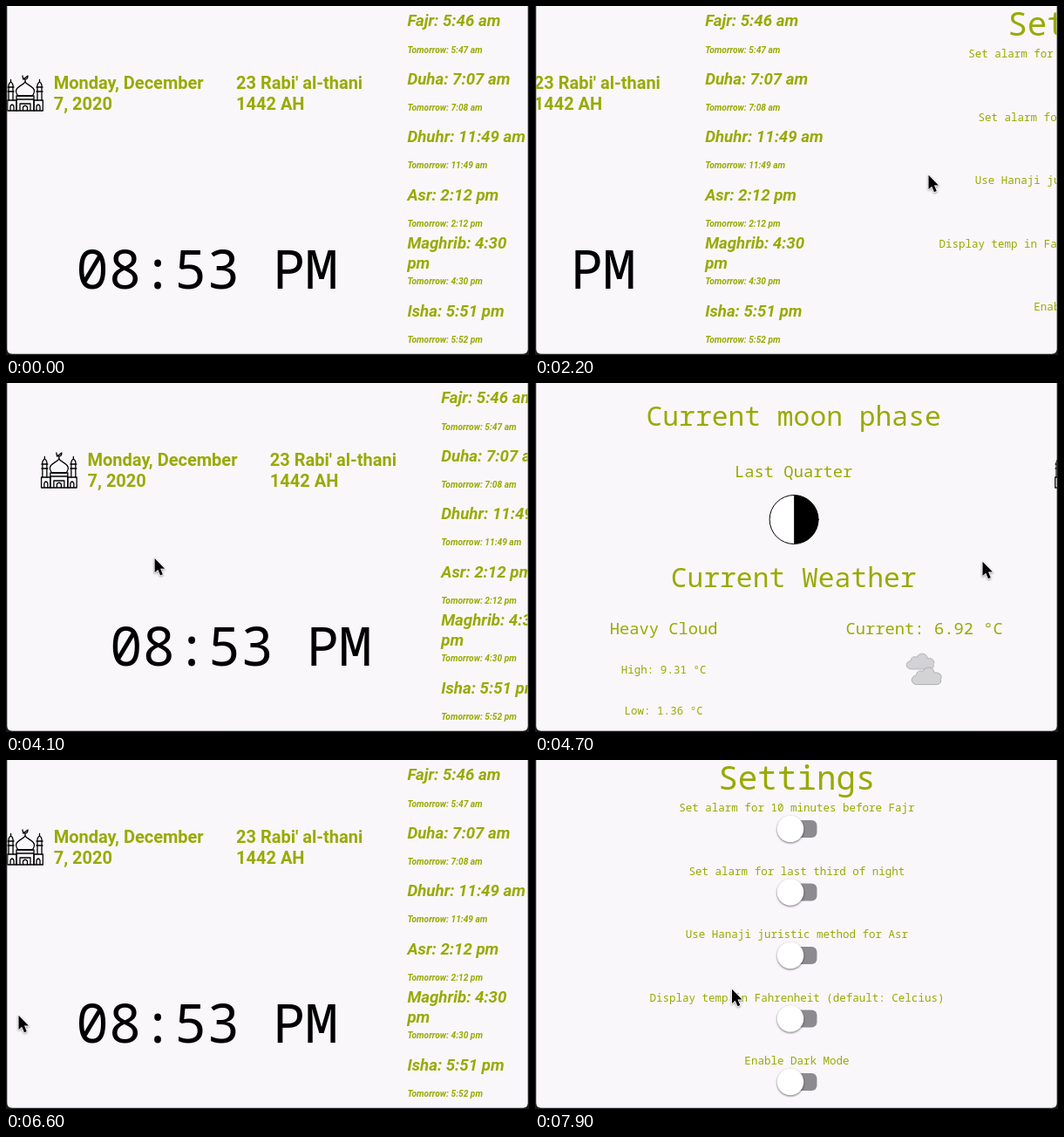
These frames come from a looping animation (600x400 px, 8 s). An HTML page:

```html
<!DOCTYPE html>
<html lang="en">
<head>
<meta charset="utf-8">
<title>Prayer times</title>
<style>
  html, body { margin: 0; width: 100%; height: 100%; overflow: hidden; background: #1b1a1c; }
  svg { display: block; width: 600px; height: 400px; }
  text { fill: #98aa00; white-space: pre; }
  .mono { font-family: "Roboto Mono", "Noto Sans Mono", monospace; text-anchor: middle; }
  .bold { font-family: Roboto, sans-serif; font-weight: 700; }
  .slant { font-style: italic; }
  .clock { fill: #000; }
  .line { fill: none; stroke: #000; stroke-width: 1.3; stroke-linejoin: round; stroke-linecap: round; }
  .cloud { fill: #d3d2d5; stroke: #aaa9ac; stroke-width: .9; }
  .thumb { fill: #fff; filter: drop-shadow(0 1px 1.3px rgba(0, 0, 0, .55)); }
  #pointer { filter: drop-shadow(0 1.5px 1.3px rgba(0, 0, 0, .4)); }
</style>
</head>
<body>
<svg viewBox="0 0 600 400">
  <defs>
    <clipPath id="window"><path d="M1.300 0H598.700V393Q598.700 398.700 593 398.700H7Q1.300 398.700 1.300 393Z"/></clipPath>
    <path id="puff" d="M6 20.500C-1.500 20.500-2 11 5 10C5.500 5 10 3.500 12.500 5.500C15-1.500 25-.5 25.500 7C32 5.500 35 11 32.500 14.500C34 18 31 20.500 28 20.500Z"/>
    <g id="tower">
      <path d="M2 29V14H7V29M1 14H8M1 19H8M2 14Q1.500 10 4.500 8Q7.500 10 7 14M4.500 8V5.500"/>
      <path d="M.7 29H11V41H.7ZM4 41V36Q6 32 8 36V41"/>
    </g>
  </defs>
  <g clip-path="url(#window)">
    <rect width="600" height="400" fill="#f9f7fa"/>
    <g id="strip">
      <g class="line" transform="translate(1 79)">
        <path d="M18 1Q18 5 21 5T24 1M18.500 5L23.500 1.500M21 5V8"/>
        <path d="M21 8C19 12 10 13 10.500 19Q11 22 13 24H29Q31 22 31.500 19C32 13 23 12 21 8Z"/>
        <path d="M11 24H31V41H11ZM11 28H31M15 41V33H27V41M18.500 41V37Q21 33.500 23.500 37V41"/>
        <use href="#tower"/>
        <use href="#tower" transform="translate(42 0) scale(-1 1)"/>
      </g>
      <g>
        <circle cx="-298" cy="156.500" r="28" fill="#fff"/>
        <path d="M-298 128.500A28 28 0 0 1-298 184.500Z"/>
        <circle cx="-298" cy="156.500" r="28" class="line" style="stroke-width:1"/>
      </g>
      <use href="#puff" class="cloud" transform="translate(-169 309.500) scale(.95 .9)"/>
      <use href="#puff" class="cloud" transform="translate(-163 325.300) scale(1.020 .99)"/>
    </g>
  </g>
  <path id="pointer" d="M.5 .7V17L4.200 13.700L7 20.200L9.800 19L7 12.600H12Z"
        stroke="#fff" stroke-width="1.600" paint-order="stroke" stroke-linejoin="round"/>
</svg>
<script>
const LOOP = 8000, STEP = 100, PAGE = 598, UNIT = 0.783;
const strip = document.getElementById("strip");
const pointer = document.getElementById("pointer");

function add(tag, attrs, content = "") {
  const el = document.createElementNS("http://www.w3.org/2000/svg", tag);
  for (const key in attrs) el.setAttribute(key, attrs[key]);
  el.textContent = content;
  strip.append(el);
}
const label = (cls, content, x, y, size) =>
  add("text", { class: cls, x, y, "font-size": size }, content);
const mono = (content, x, y, size) => label("mono", content, x, y, size * UNIT);

function stack(cls, content, x, y, size, leading) {
  content.split("\n").forEach((line, i) => label(cls, line, x, y + i * leading, size));
}

// Home page
stack("bold", "Monday, December\n7, 2020", 54.7, 95, 20, 23.5);
stack("bold", "23 Rabi' al-thani\n1442 AH", 264, 95, 20, 23.5);
label("mono clock", "08:53 PM", 230.5, 324, 80 * UNIT);

[
  ["Fajr: 5:46 am", "5:47 am"],
  ["Duha: 7:07 am", "7:08 am"],
  ["Dhuhr: 11:49 am", "11:49 am"],
  ["Asr: 2:12 pm", "2:12 pm"],
  ["Maghrib: 4:30\npm", "4:30 pm"],
  ["Isha: 5:51 pm", "5:52 pm"]
].forEach(([today, tomorrow], i) => {
  const y = 23.3 + i * 66.45;
  const rise = today.includes("\n") ? 11.2 : 0;
  stack("bold slant", today, 460.4, y - rise, 18.7, 22.6);
  label("bold slant", "Tomorrow: " + tomorrow, 460.4, y + 30.2, 10.2);
});

// Moon and weather page
const moonX = -PAGE / 2 + 0.5, leftX = moonX - 149, rightX = moonX + 150;
mono("Current moon phase", moonX, 48.5, 40);
mono("Last Quarter", moonX, 108, 24);
mono("Current Weather", moonX, 233.5, 40);
mono("Heavy Cloud", leftX, 288, 24);
mono("High: 9.31 °C", leftX, 333, 16);
mono("Low: 1.36 °C", leftX, 380.3, 16);
mono("Current: 6.92 °C", rightX, 288, 24);

// Settings page
const settingsX = PAGE * 1.5 + 0.7;
mono("Settings", settingsX, 33.5, 48);
[
  "Set alarm for 10 minutes before Fajr",
  "Set alarm for last third of night",
  "Use Hanaji juristic method for Asr",
  "Display temp in Fahrenheit (default: Celcius)",
  "Enable Dark Mode"
].forEach((name, i) => {
  const y = 79 + i * 72.5;
  mono(name, settingsX, y - 20, 16);
  add("rect", { x: settingsX - 17, y: y - 10, width: 40, height: 20, rx: 6, fill: "#8d8b90" });
  add("circle", { class: "thumb", cx: settingsX - 7.5, cy: y, r: 15.3 });
});

// Each swipe turns one page, fastest at its middle time
const swipes = [
  { mid: 1075, turn: -1 },
  { mid: 2183, turn: 1 },
  { mid: 4300, turn: 1 },
  { mid: 5850, turn: -1 },
  { mid: 7400, turn: -1 }
];
const offsetAt = t => swipes.reduce(
  (x, { mid, turn }) => x + turn * PAGE / (1 + Math.exp((mid - t) / 75)), 0);

// Where the hand grabs, lets go and rests: time, x, y
const stops = [
  [400, 560, 260], [900, 386, 206], [1100, 47, 205],
  [1950, 118, 196], [2200, 451, 193], [3000, 394, 190],
  [4000, 150, 200], [4700, 513, 204],
  [5600, 480, 260], [6000, 14, 292], [6600, 14, 292],
  [7200, 575, 272], [7600, 225.5, 262]
];

function tipAt(t) {
  const next = stops.findIndex(s => s[0] > t);
  if (next < 1) return stops.at(next).slice(1);
  const [t0, x0, y0] = stops[next - 1], [t1, x1, y1] = stops[next];
  const u = (t - t0) / (t1 - t0), k = u * u * (3 - 2 * u);
  return [x0 + (x1 - x0) * k, y0 + (y1 - y0) * k];
}

const begin = performance.now();
function draw(now) {
  const t = Math.floor(Math.max(0, now - begin) % LOOP / STEP) * STEP;
  strip.setAttribute("transform", `translate(${offsetAt(t)} 0)`);
  pointer.setAttribute("visibility", t < stops[0][0] ? "hidden" : "visible");
  pointer.setAttribute("transform", `translate(${tipAt(t)})`);
  requestAnimationFrame(draw);
}
draw(begin);
</script>
</body>
</html>
```
